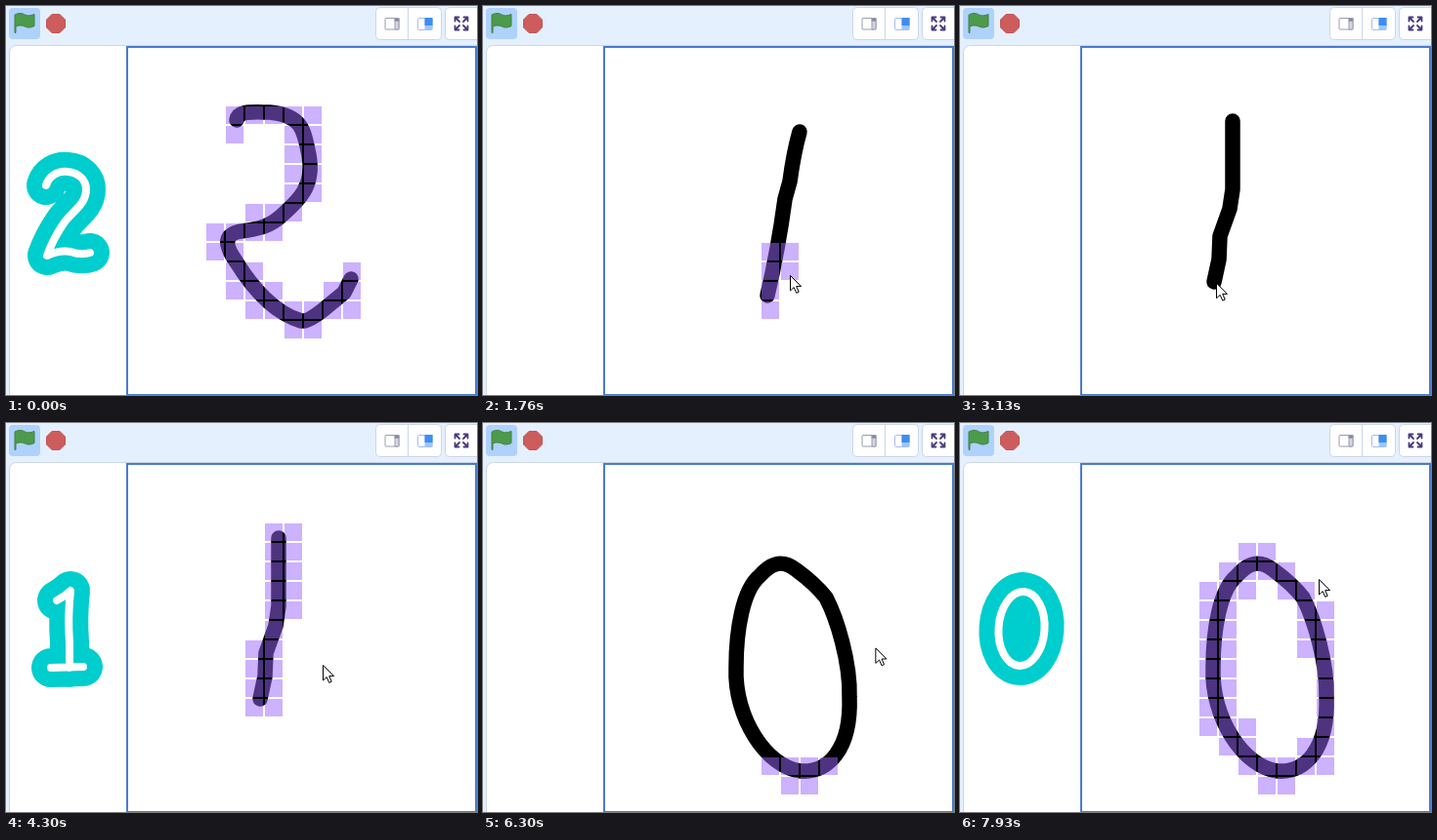
An HTML page that plays this animation: 482x399 px, repeating every 8 s.

```html
<!DOCTYPE html>
<html lang="en">
<head>
<meta charset="utf-8">
<title>Digit recogniser</title>
<style>
  html, body { margin: 0; width: 100%; height: 100%; overflow: hidden; background: #e5f0fe; }
  svg { display: block; width: 482px; height: 399px; }
  .line { fill: none; stroke-linecap: round; stroke-linejoin: round; }
  .outer { stroke: #00cdcd; stroke-width: 40; }
  .inner { stroke: #fff; stroke-width: 8; }
</style>
</head>
<body>
<svg viewBox="0 0 482 399">
  <defs>
    <path id="two" d="M41 184C44 174 53 169 63 170C75 171 82 179 82 188C82 204 67 211 59 223Q48 239 42 256Q55 250 66 252Q77 256 86 253"/>
    <path id="one" d="M52 182Q60 178 66 172Q63 199 65 225V251M46 251L79 250"/>
    <ellipse id="zero" cx="63" cy="211" rx="23.5" ry="38" transform="rotate(4 63 211)"/>
    <path id="corner" d="M2 2L6.500 6.500M6.500 2.500V6.500H2.500"/>
  </defs>

  <!-- toolbar -->
  <rect x="3" y="2" width="32" height="32" rx="4" fill="#aed2fc"/>
  <path d="M9 9C14 6.500 17 7.500 19.500 9C22.500 10.500 25 10 29 8.500V20.500C25 22.500 22 22.500 19.500 21C16.500 19.500 13 19.500 10 21V27.500H9Z"
        fill="#4c9a4c" stroke="#45813f" stroke-linejoin="round"/>
  <path d="M47 8.500H55L60.500 14V22L55 27.500H47L41.500 22V14Z" fill="#cd5c5c" stroke="#c25757"/>
  <g fill="#fff" stroke="#c9d7ea">
    <rect x="378.500" y="1.500" width="67" height="33" rx="4"/>
    <path d="M411.500 1.500V34.500"/>
    <rect x="449.500" y="1.500" width="40" height="33" rx="4"/>
  </g>
  <g fill="#fff" stroke="#9a9cb0">
    <rect x="388" y="12.500" width="14" height="11.500" rx="1"/>
    <path d="M398 12.500H402V24H398Z" fill="#d5d6e2"/>
    <path d="M398 12.500H402V15.500H398Z" fill="#85879d"/>
  </g>
  <rect x="421.500" y="12.500" width="14.500" height="12" rx="1" fill="#fff" stroke="#a9b9f5"/>
  <path d="M428.500 12H436.500V24.500H428.500Z" fill="#9cc6fb"/>
  <path d="M428.500 12H436.500V20H428.500Z" fill="#3f8df0"/>
  <g class="line" stroke="#4b3a7c" stroke-width="1.800" transform="translate(466 18)">
    <use href="#corner"/>
    <use href="#corner" transform="rotate(90)"/>
    <use href="#corner" transform="rotate(180)"/>
    <use href="#corner" transform="rotate(270)"/>
  </g>

  <!-- stage -->
  <rect x="3.500" y="40.500" width="490" height="380" rx="7" fill="#fff" stroke="#ccd6e6"/>
  <rect x="124" y="42" width="357" height="357" fill="#fff" stroke="#4a7bcf" stroke-width="2"/>

  <g id="label-2" class="line"><use href="#two" class="outer"/><use href="#two" class="inner"/></g>
  <g id="label-1" class="line"><use href="#one" class="outer"/><use href="#one" class="inner"/></g>
  <g id="label-0" class="line"><use href="#zero" class="outer" fill="#00cdcd"/><use href="#zero" class="inner"/></g>

  <path id="ink" class="line" stroke="#000" stroke-width="15.500"/>
  <path id="cells" fill="#96f" fill-opacity=".5"/>
  <circle id="halo" r="12" fill="#ff0" fill-opacity=".53"/>
  <path id="cursor" d="M.5 .5V16L4.200 12.600L6.700 18.400L9.200 17.300L6.700 11.600H11.500Z" fill="#fff" stroke="#000"/>
</svg>
<script>
const LOOP = 8000, TICK = 1000 / 30, PITCH = 20, CELL = 18, REACH = 7, HOVER = 150, LEAD = 20;
const byId = id => document.getElementById(id);

// Pen goes down at start, draws for duration and lifts at up; scan stamps the first cell.
// Afterwards the cursor visits each rest between its arrive and leave times.
const strokes = [
  { digit: '2', start: -5000, duration: 800, up: -4000, scan: -3000,
    path: 'M236 117C238 107 252 109 270 109C304 112 305 129 310 153C316 185 299 200 282 215C270 226 259 228 248 230' +
          'C225 232 220 240 236 263C252 289 275 315 302 323Q309 325 329 308L346 294L353 280',
    rests: [{ arrive: 0, at: [374, 400], leave: 120 }] },
  { digit: '1', start: 740, duration: 620, up: 1570, scan: 1580,
    path: 'M324 129Q318 150 314 180L309 198Q302 250 291 297',
    rests: [{ arrive: 1740, at: [314, 276], leave: 2300 }] },
  { digit: '1', start: 2700, duration: 350, up: 3110, scan: 3420,
    path: 'M279 118V188L276 208L266 236L265 260L260 283',
    rests: [{ arrive: 3330, at: [350, 318], leave: 4100 }, { arrive: 4300, at: [324, 248], leave: 4300 }] },
  { digit: '0', start: 4800, duration: 910, up: 5800, scan: 6127,
    path: 'M321 151C307 140 296 142 283 157C266 171 259 212 259 251C257 302 290 353 325 357' +
          'C353 359 377 335 375 281C376 245 362 200 351 179Q340 165 321 151',
    rests: [{ arrive: 6400, at: [407, 236], leave: 7600 }, { arrive: 7900, at: [367, 160], leave: LOOP }] }
];

const clamp = (v, lo, hi) => Math.min(hi, Math.max(lo, v));
const ease = k => (1 - Math.cos(Math.PI * clamp(k, 0, 1))) / 2;
const drawnLength = (s, t) => s.length * ease((t - s.start) / s.duration);

// Grid cells touched by the stroke, bottom row first, left to right.
function touchedCells({ curve, length }) {
  const samples = Array.from({ length: Math.ceil(length) + 1 }, (_, i) => curve.getPointAtLength(i));
  const cells = [];
  for (let y = 383; y >= 43; y -= PITCH)
    for (let x = 125; x < 480; x += PITCH)
      if (samples.some(p =>
        Math.hypot(p.x - clamp(p.x, x, x + CELL), p.y - clamp(p.y, y, y + CELL)) < REACH)) cells.push([x, y]);
  return cells;
}

for (const s of strokes) {
  s.curve = document.createElementNS('http://www.w3.org/2000/svg', 'path');
  s.curve.setAttribute('d', s.path);
  s.length = s.curve.getTotalLength();
  s.cells = touchedCells(s);
  s.recognised = s.scan + s.cells.length * TICK + 100;
}

const stop = (time, { x, y }) => ({ time, x, y });
const stops = strokes.flatMap(s => [
  stop(s.start - HOVER, s.curve.getPointAtLength(0)),
  stop(s.up, s.curve.getPointAtLength(s.length)),
  ...s.rests.flatMap(({ arrive, at: [x, y], leave }) => [stop(arrive, { x, y }), stop(leave, { x, y })])
]);

function cursorAt(t, stroke) {
  if (t < stroke.up) return stroke.curve.getPointAtLength(drawnLength(stroke, t + LEAD));
  const next = stops.findIndex(s => s.time > t);
  if (next < 0) return stops.at(-1);
  const a = stops[next - 1], b = stops[next], k = ease((t - a.time) / (b.time - a.time));
  return { x: a.x + (b.x - a.x) * k, y: a.y + (b.y - a.y) * k };
}

const show = (el, on) => el.setAttribute('visibility', on ? 'visible' : 'hidden');
const moveTo = (el, p) => el.setAttribute('transform', `translate(${p.x} ${p.y})`);

function render(t) {
  const index = strokes.findLastIndex(s => s.start <= t), stroke = strokes[index];
  const ink = byId('ink');
  ink.setAttribute('d', stroke.path);
  ink.setAttribute('stroke-dasharray', `${drawnLength(stroke, t)} ${stroke.length + 20}`);

  const stamped = Math.max(0, Math.floor((t - stroke.scan) / TICK) + 1);
  byId('cells').setAttribute('d', stroke.cells.slice(0, stamped)
    .map(([x, y]) => `M${x} ${y}h${CELL}v${CELL}h-${CELL}z`).join(''));

  const label = t < stroke.up ? strokes[index - 1].digit : t < stroke.recognised ? '' : stroke.digit;
  for (const digit of '012') show(byId('label-' + digit), digit === label);

  const cursor = cursorAt(t, stroke);
  moveTo(byId('cursor'), cursor);
  moveTo(byId('halo'), cursor);
  show(byId('halo'), t < stroke.up);
}

const origin = performance.now();
function frame() {
  render((performance.now() - origin) % LOOP);
  requestAnimationFrame(frame);
}
frame();
</script>
</body>
</html>
```
